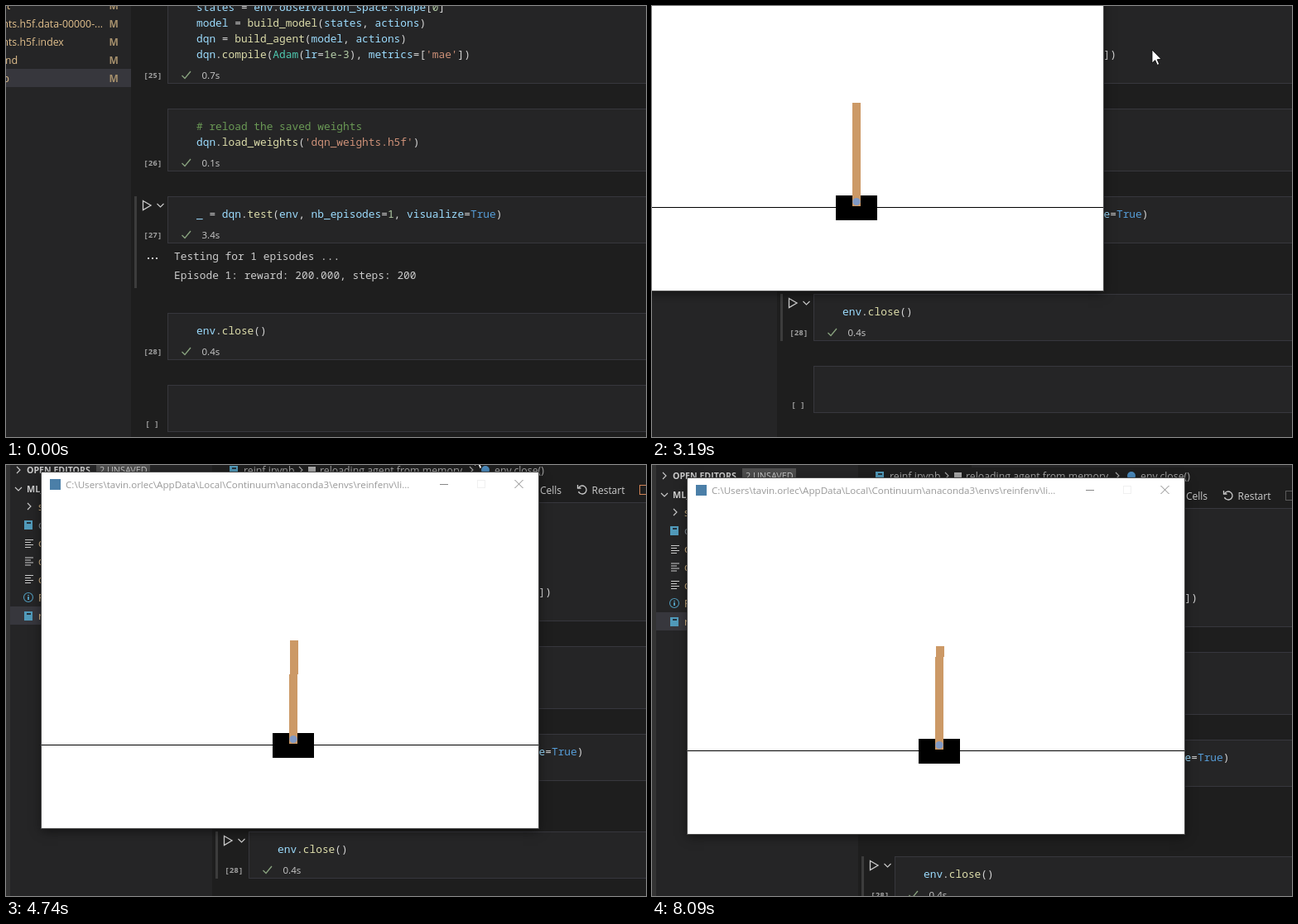
An HTML page with a canvas for the animation above (8.49 s loop, 773x521 px).

```html
<!DOCTYPE html>
<html lang="en">
<head>
<meta charset="utf-8">
<title>Notebook agent test</title>
<style>
html, body { margin: 0; height: 100%; overflow: hidden; background: #1e1e1e; }
canvas { display: block; }
</style>
</head>
<body>
<canvas id="stage" width="773" height="521"></canvas>
<script>
const ctx = document.getElementById('stage').getContext('2d');
const LOOP = 8490, CLICK = 860, BLINK = 1360, RUN = 1890, OPEN = 1960, PRINT = 2100, DONE = 5600;
const MONO = '12.83px "Noto Sans Mono", monospace';
const UI = '"Open Sans", "Noto Sans", sans-serif';
const BLUE = '#007acc', TAN = '#e2c08d', GREY = '#cccccc';

// Each key is [time, ...values]
const pan = [[3640, 0, 0], [3900, 9, 5], [4100, 24, 14], [4480, 91, 71], [4760, 98, 97], [5000, 98, 102]];
const cart = [[1960, 249, 0], [2030, 249, -.009], [2400, 248, .009], [2700, 248.4, -.008], [3050, 247, .004],
  [3400, 248, -.008], [3750, 248, .006], [4100, 248, 0], [4480, 249, .002], [4900, 249, .009],
  [5370, 250, -.009], [5600, 249, .0047]];
const pointerRuns = [
  [130, 3600, [[130, 761, 463], [600, 676, 318], [960, 651, 272], [2130, 651, 272], [2690, 655, 222], [3200, 603, 50], [3530, 566, -20]]],
  [4300, 5600, [[4300, 566, -14]]],
  [6380, 8090, [[6380, 553, 8], [6450, 380, 4], [6580, 380, 4], [7210, 606, 194], [7670, 606, 194], [8020, 747, 496]]]
];

function at(keys, t) {
  const i = keys.findIndex(k => k[0] > t);
  if (i < 0) return keys[keys.length - 1].slice(1);
  if (i === 0) return keys[0].slice(1);
  const a = keys[i - 1], b = keys[i], p = (t - a[0]) / (b[0] - a[0]);
  return a.slice(1).map((v, n) => v + (b[n + 1] - v) * p);
}

function rect(x, y, w, h, color) {
  ctx.fillStyle = color;
  ctx.fillRect(x, y, w, h);
}

function box(x, y, w, h, color) {
  ctx.strokeStyle = color;
  ctx.lineWidth = 1;
  ctx.strokeRect(x + .5, y + .5, w - 1, h - 1);
}

function line(points, color, width = 1.1, close = false) {
  ctx.beginPath();
  points.forEach(([x, y]) => ctx.lineTo(x, y));
  if (close) ctx.closePath();
  ctx.strokeStyle = color;
  ctx.lineWidth = width;
  ctx.stroke();
}

function disc(x, y, r, color) {
  ctx.beginPath();
  ctx.arc(x, y, r, 0, 7);
  ctx.fillStyle = color;
  ctx.fill();
}

function text(str, x, y, color, font) {
  ctx.font = font;
  ctx.fillStyle = color;
  ctx.fillText(str, x, y);
}

const label = (str, x, y, color = GREY, size = 12.6) => text(str, x, y, color, `${size}px ${UI}`);

function tokenColor(token, next) {
  if (token[0] === '#') return '#6a9955';
  if (token[0] === "'") return '#ce9178';
  if (token === 'True') return '#569cd6';
  if (token === 'Adam') return '#4ec9b0';
  if (/^\d/.test(token)) return '#b5cea8';
  if (/^\w/.test(token)) return next === '(' ? '#dcdcaa' : '#9cdcfe';
  return '#d4d4d4';
}

function code(str, x, y) {
  for (const m of str.matchAll(/#.*|'[^']*'|\d[\d.]*(e-\d+)?|\w+|\s+|./g)) {
    text(m[0], x, y, tokenColor(m[0], str[m.index + m[0].length]), MONO);
    x += ctx.measureText(m[0]).width;
  }
}

function chevron(x, y, down, color = GREY) {
  line(down ? [[x - 4, y - 2], [x, y + 2], [x + 4, y - 2]] : [[x - 2, y - 4], [x + 2, y], [x - 2, y + 4]], color);
}

function cell(top, bottom, count, seconds, lines, border = '#37373d') {
  rect(195, top, 700, bottom - top, '#252526');
  box(195, top, 700, bottom - top, border);
  text(`[${count}]`, count === ' ' ? 168 : 166, bottom - 7, '#a0a0a0', 'bold 9.4px "Noto Sans Mono", monospace');
  if (seconds) {
    line([[212.5, bottom - 10], [216, bottom - 6.5], [223, bottom - 15]], '#89a37f', 1.3);
    label(seconds, 236.5, bottom - 6, GREY, 11.5);
  }
  lines.forEach((s, i) => code(s, 230, top + 26 + i * 19));
}

function focusBar(top, bottom, color) {
  rect(155, top, 3, bottom - top, color);
  const y = top + 11;
  line([[165.5, y - 5.5], [175, y], [165.5, y + 5.5]], GREY, 1.3, true);
  chevron(186.5, y, true);
}

function notebookIcon(x, y) {
  rect(x, y - 5, 10, 11, '#519aba');
  rect(x + 3, y - 3, 5, 2, '#26333c');
}

function listIcon(x, y) {
  [10, 7, 10, 7].forEach((w, i) => rect(x, y - 5 + i * 3, w, 1, GREY));
}

function sidebar() {
  rect(-98, -110, 5, 700, '#333333');
  rect(-93, -110, 244, 700, '#252526');
  rect(-93, 76, 244, 22, '#37373d');
  chevron(-83, -89, false);
  text('OPEN EDITORS', -73, -85, GREY, `bold 10.6px ${UI}`);
  rect(11, -98, 65, 17, '#4d4d4d');
  label('2 UNSAVED', 15, -85, GREY, 10.8);
  chevron(-83, -66, true);
  text('ML_agents', -73, -62, GREY, `bold 10.8px ${UI}`);
  chevron(-70, -45, false);
  label('src', -59, -40, TAN);
  notebookIcon(-76, -23);
  label('cartpole.ipynb', -59, -18, '#8c9aa3');
  [0, 21.5, 43].forEach(y => listIcon(-75, y));
  listIcon(-75, 0);
  label('checkpoint', -59, 4, TAN);
  label('dqn_weights.h5f.data-00000-...', -59, 26, TAN, 12.3);
  label('dqn_weights.h5f.index', -59, 48, TAN, 12.3);
  ctx.beginPath();
  ctx.arc(-71, 65, 5.5, 0, 7);
  ctx.strokeStyle = '#519aba';
  ctx.stroke();
  rect(-72, 62, 2, 1, '#519aba');
  rect(-72, 64, 2, 4, '#519aba');
  label('README.md', -59, 70, TAN);
  notebookIcon(-76, 87);
  label('reinf.ipynb', -59, 92, TAN);
  for (let i = 0; i < 5; i++) text('M', 124.5, 4 + i * 21.9, '#a58f6c', `bold 12px ${UI}`);
}

function toolbar(t) {
  rect(288, -103, 600, 4, '#252526');
  notebookIcon(172, -89);
  label('reinf.ipynb', 189, -84, '#a9a9a9', 12.3);
  chevron(258, -89, false, '#a9a9a9');
  rect(267, -93, 9, 9, '#a9a9a9');
  label('reloading agent from memory', 281, -84, '#a9a9a9', 12.3);
  chevron(464, -89, false, '#a9a9a9');
  disc(481, -89, 5, '#4b8bbe');
  label('env.close()', 492, -84, '#a9a9a9', 12.3);
  label('Cells', 547, -60, GREY, 12);
  ctx.beginPath();
  ctx.arc(598, -65, 5, -2.6, 2.7);
  ctx.strokeStyle = GREY;
  ctx.lineWidth = 1.3;
  ctx.stroke();
  line([[592.5, -71], [592.5, -67], [596.5, -67]], GREY, 1.3);
  label('Restart', 609.5, -60, GREY, 12);
  box(667, -71, 12, 12, t < DONE ? '#d18254' : '#5a5a5a');
}

function notebook(t) {
  const editing = t >= CLICK && t < RUN;
  const testFocused = t < RUN;
  const closeTop = t < RUN ? 371 : t < PRINT ? 318 : t < DONE ? 348 : 371;

  cell(-50, 94, 25, '0.7s', []);
  ['states = env.observation_space.shape[0]', 'model = build_model(states, actions)',
    'dqn = build_agent(model, actions)', "dqn.compile(Adam(lr=1e-3), metrics=['mae'])"]
    .forEach((s, i) => code(s, 230, 6 + i * 19));
  cell(124, 200, 26, '0.1s', ['# reload the saved weights', "dqn.load_weights('dqn_weights.h5f')"]);
  cell(230, 287, 27, testFocused ? '3.4s' : '', ['_ = dqn.test(env, nb_episodes=1, visualize=True)'], editing ? BLUE : '#37373d');
  if (testFocused) focusBar(230, 341, editing ? BLUE : '#3c3c3c');
  if (editing) {
    box(322, 243, 8, 18, '#888888');
    box(592, 243, 8, 18, '#888888');
    if (t < BLINK) rect(599, 242, 2, 19, '#aeafad');
  }
  if (t < RUN || t >= PRINT) {
    [171, 176, 181].forEach(x => rect(x, 304, 2, 2, GREY));
    text('Testing for 1 episodes ...', 203, 307, GREY, MONO);
  }
  if (t < RUN || t >= DONE) text('Episode 1: reward: 200.000, steps: 200', 203, 330, GREY, MONO);

  cell(closeTop, closeTop + 57, 28, '0.4s', ['env.close()']);
  cell(closeTop + 87, closeTop + 144, ' ', '', []);
  if (!testFocused) focusBar(closeTop, closeTop + 57, t < PRINT ? BLUE : '#3c3c3c');
}

function simulator(t) {
  ctx.save();
  ctx.shadowColor = 'rgba(0,0,0,.55)';
  ctx.shadowBlur = 12;
  ctx.shadowOffsetY = 3;
  rect(-55, -86, 600, 430, '#ffffff');
  ctx.restore();
  box(-56, -87, 602, 432, '#4a4a4a');

  rect(-45, -78, 13, 13, '#4b7fa8');
  label('C:\\Users\\tavin.orlec\\AppData\\Local\\Continuum\\anaconda3\\envs\\reinfenv\\li...', -26, -67, '#999999', 11.6);
  line([[426, -71.5], [436, -71.5]], '#888888', 1);
  box(471, -77, 10, 10, '#f0f0f0');
  line([[516.5, -77], [526.5, -67]], '#888888', 1);
  line([[526.5, -77], [516.5, -67]], '#888888', 1);

  const [cx, lean] = at(cart, t);
  const x = Math.round(cx);
  rect(x - 25, 229, 50, 30, '#000000');
  rect(-55, 243, 600, 1, '#000000');
  // Whole-pixel rows keep the hard stair step of an unsmoothed polygon
  for (let h = -5; h < 120; h++) rect(x - 5 + Math.round(lean * h), 236 - h, 10, 1, '#cc9966');
  disc(x, 236.5, 4.6, '#8099c4');
}

function recorderEdge() {
  rect(767, 0, 4, 521, '#ffffff');
  rect(771, 0, 2, 521, '#2b2b2b');
  rect(0, 516, 771, 5, '#ffffff');
  [429, 538, 644].forEach(x => rect(x, 517, 1, 4, '#cccccc'));
  disc(450, 529, 12, '#b5714a');
  [[466, 45], [545, 33], [591, 33]].forEach(([x, w]) => box(x, 519, w, 10, '#aaaaaa'));
}

function pointer(t) {
  const run = pointerRuns.find(([from, to]) => t >= from && t < to);
  if (!run) return;
  const [x, y] = at(run[2], t).map(Math.round);
  ctx.beginPath();
  [[0, 0], [0, 16], [3.7, 12.6], [6.3, 18.4], [8.7, 17.3], [6.2, 11.7], [11, 11.3]]
    .forEach(([dx, dy]) => ctx.lineTo(x + dx, y + dy));
  ctx.closePath();
  ctx.fillStyle = '#ffffff';
  ctx.fill();
  ctx.strokeStyle = '#000000';
  ctx.lineWidth = .8;
  ctx.stroke();
}

function draw(now) {
  const t = now % LOOP;
  const [dx, dy] = at(pan, t).map(Math.round);
  rect(0, 0, 773, 521, '#1e1e1e');
  ctx.save();
  ctx.translate(dx, dy);
  notebook(t);
  toolbar(t);
  sidebar();
  if (t >= OPEN) simulator(t);
  ctx.restore();
  if (t > 3800 && t < 4430) recorderEdge();
  pointer(t);
}

const start = performance.now();
function tick() {
  draw(performance.now() - start);
  requestAnimationFrame(tick);
}
tick();
</script>
</body>
</html>
```
